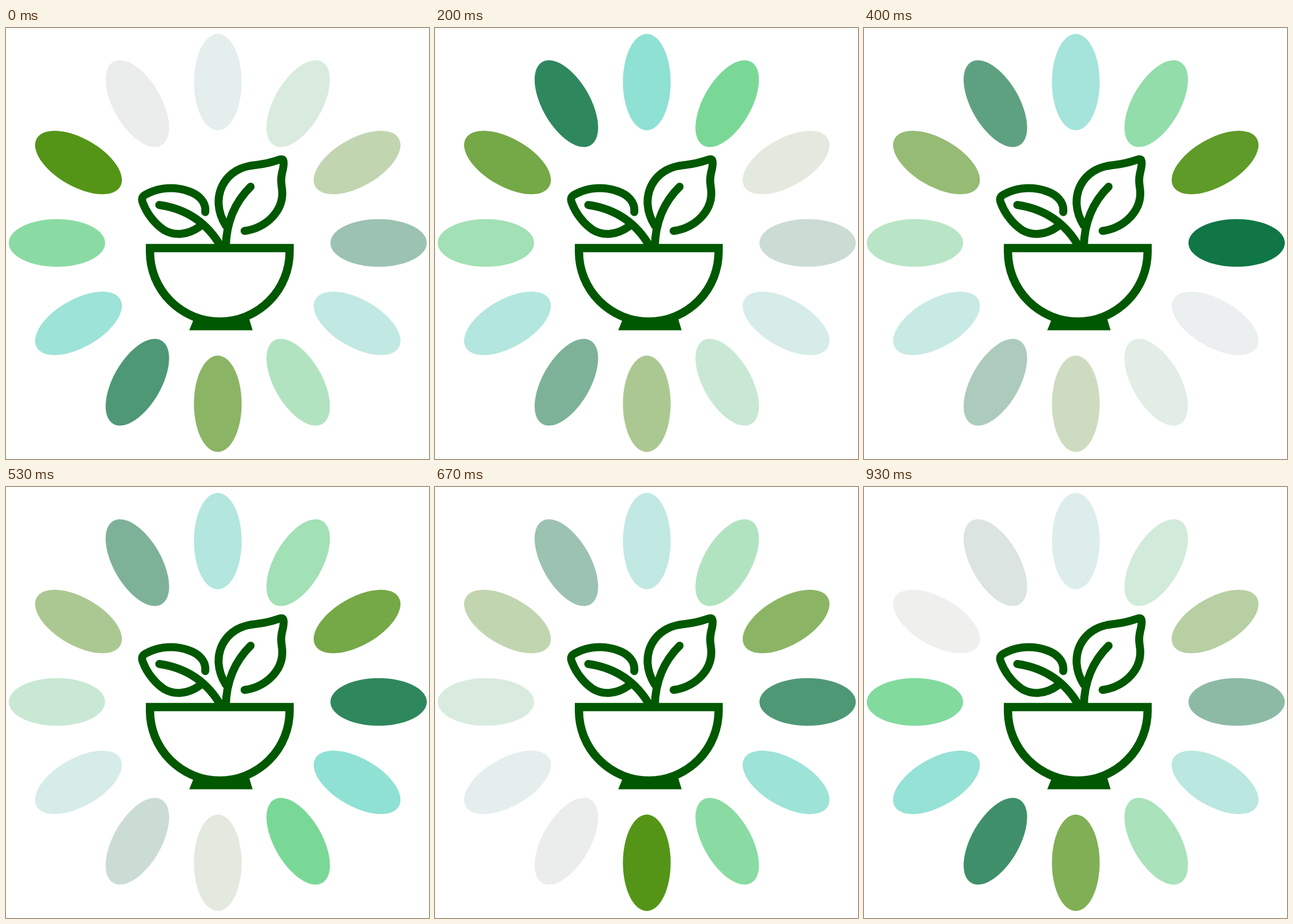
Recreate the animation shown at these times as an HTML page. Size 741 by 755 pixels, loop 0.99 s.

```html
<!DOCTYPE html>
<html lang="en">
<head>
<meta charset="utf-8">
<title>Salad bowl loader</title>
<style>
  html, body { margin: 0; width: 100%; height: 100%; overflow: hidden; background: #fff; }
  svg { display: block; width: 100%; height: 100%; }
  .icon { fill: none; stroke: #005800; stroke-width: 14; stroke-linecap: round; stroke-linejoin: round; }
  .bowl { stroke-width: 14.5; stroke-linejoin: miter; }
  .foot { fill: #005800; stroke: none; }
</style>
</head>
<body>
<svg viewBox="0 0 741 755">
  <g id="petals"></g>
  <g class="icon">
    <path d="M268.5 310C310 316 350 336 377 384"/>
    <path d="M349 322.5C351 305 338 292 320 286C296 277.5 268 278.5 244 292C238 295.5 237 300 240 307C247 326 262 344 277 354C295 364.5 318 363 339 348"/>
    <path d="M428.5 278C404 302 386 335 385 384"/>
    <path d="M418 355.5C456 350 488 320 483.5 282C482 271 481 264 484 252C486 244 487 237 486 233C485 228.5 480 230 476 231.5C455 239 445 238.5 427 241.5C388 249 371 280 372.5 309C373.5 323 378 335 385 346"/>
    <path class="bowl" d="M252.2 385.5H496.8V392A122.3 122.3 0 0 1 252.2 392Z"/>
    <path class="foot" d="M328.5 511H426.5L432 529.5H321Z"/>
  </g>
</svg>
<script>
  const LOOP = 990, STEPS = 15, COUNT = 12, FIRST = 10;
  const LEAD = 0.875; // steps by which the first petal is already fading at time 0
  const REST = [240, 240, 240];
  const HUES = [[133, 223, 209], [121, 216, 150], [74, 143, 11], [6, 113, 63]];

  const group = document.getElementById('petals');
  const petals = Array.from({ length: COUNT }, (_, i) => {
    const el = document.createElementNS('http://www.w3.org/2000/svg', 'ellipse');
    const attrs = { cx: 371, cy: 94.75, rx: 41.8, ry: 84.4, transform: `rotate(${i * 360 / COUNT} 371 376.5)` };
    for (const name in attrs) el.setAttribute(name, attrs[name]);
    group.append(el);
    return { el, hue: HUES[i % HUES.length], order: (i - FIRST + COUNT) % COUNT };
  });

  // Steps last 60 or 70 ms: their starts snap to 10 ms.
  const stepStart = n => Math.round(n * 100 / STEPS) * 10;

  function stepAt(t) {
    let n = STEPS - 1;
    while (n > 0 && stepStart(n) > t) n--;
    return n;
  }

  function draw(step) {
    for (const { el, hue, order } of petals) {
      const p = ((step + LEAD) / STEPS - order / COUNT + 1) % 1;
      const rgb = hue.map((c, k) => Math.round(c + (REST[k] - c) * p));
      el.setAttribute('fill', `rgb(${rgb})`);
    }
  }

  const start = performance.now();
  let shown = 0;
  function tick() {
    const step = stepAt((performance.now() - start) % LOOP);
    if (step !== shown) draw(shown = step);
    requestAnimationFrame(tick);
  }
  draw(0);
  requestAnimationFrame(tick);
</script>
</body>
</html>
```
